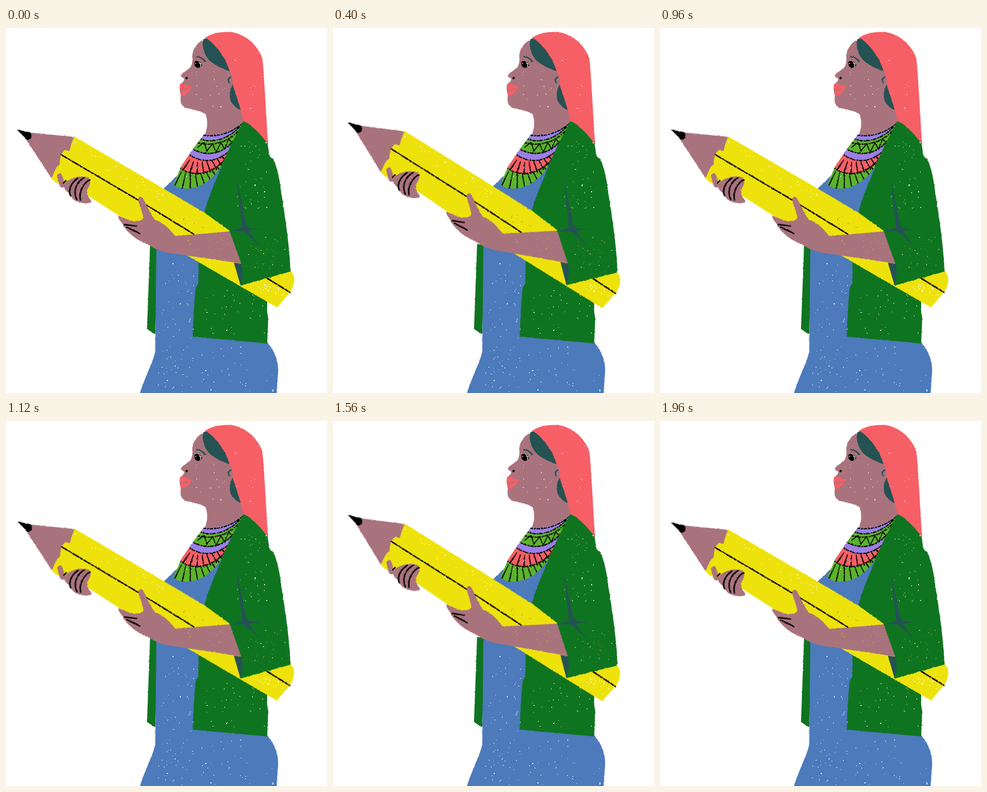
Animation of 617x700 px, one loop 2 s. Source, as an HTML page:

```html
<!DOCTYPE html>
<html lang="en">
<head>
<meta charset="utf-8">
<title>Woman with a giant pencil</title>
<style>
  html, body { margin: 0; width: 100%; height: 100%; overflow: hidden; background: #fff; }
  svg { display: block; width: 100%; height: 100%; }
  .skin { fill: #a9737d; }
  .coral { fill: #f65f66; }
  .jacket { fill: #0f7420; }
  .dress { fill: #4c7abb; }
  .teal { fill: #255253; }
  .lime { fill: #5bb32b; }
  .lilac { fill: #9b80e6; }
  .yellow { fill: #eee20d; }
  .ink { fill: none; stroke: #0b0a08; stroke-linecap: round; }
  .ticks { fill: none; stroke: #0b0a08; }
  .beads { fill: none; stroke: #0b0a08; stroke-width: 2.4; stroke-dasharray: 7 1.5 4 1; }
  #lift {
    transform-origin: 476px 420px;
    animation: lift .5s cubic-bezier(.37, 0, .63, 1) infinite alternate;
  }
  @keyframes lift {
    from { transform: rotate(0deg); }
    to { transform: rotate(1.95deg); }
  }
</style>
</head>
<body>
<svg viewBox="0 0 617 700">
  <defs>
    <filter id="rough" x="-5%" y="-5%" width="110%" height="110%" color-interpolation-filters="sRGB">
      <feTurbulence type="fractalNoise" baseFrequency=".35" numOctaves="2" seed="4"/>
      <feDisplacementMap in="SourceGraphic" scale="2.6" xChannelSelector="R" yChannelSelector="G"/>
    </filter>
    <clipPath id="collar">
      <path d="M381 204L358 234L337 265L322 299C328 309 350 311 372 303C390 294 405 280 413 266C422 246 442 208 457 179C440 197 405 209 381 204Z"/>
    </clipPath>
  </defs>

  <g filter="url(#rough)">
    <path class="jacket" d="M277 415H292L287 588L271 577Z"/>
    <path class="dress" d="M303 308L325 287L400 220L457 180L420 270L392 360L380 580L500 596L503 604C518 622 524 640 523 660L520 702H257C267 668 284 640 287 618L289 415Z"/>

    <!-- head -->
    <path class="skin" d="M381 22C366 28 358 42 358 55C359 63 358 70 354 76C346 83 337 87 336 92C337 95 341 95 343 98C342 103 336 106 334 111C333 118 335 124 336 130C334 140 337 150 345 153C358 157 376 158 384 166C388 178 388 194 381 207L425 212L458 180C460 150 450 100 432 78Z"/>
    <path class="teal" d="M379 22C376 38 382 54 393 64C406 74 419 79 430 83L420 40L388 18Z"/>
    <path class="teal" d="M436 108C430 117 428 132 433 142C439 150 445 156 451 157L452 140Z"/>
    <path class="coral" d="M383 18C400 8 425 5 443 10C470 18 488 42 493 60C497 100 500 170 504 223L456 178C451 150 440 125 435 106C437 98 434 88 430 83C422 57 405 33 383 18Z"/>
    <path d="M433 94C427 95 426 102 430 106" fill="none" stroke="#255253" stroke-width="2.6"/>
    <path d="M366 55Q377 55 383 65" fill="none" stroke="#255253" stroke-width="3.2"/>
    <path d="M363 64C368 62 374 65 377 70C374 76 369 78 365 75C361 71 361 67 363 64Z"/>
    <path d="M371 66l4 3l-2 5M364 67l1 2" fill="none" stroke="#fff" stroke-width="1.3"/>
    <ellipse cx="347" cy="96" rx="2" ry="2.5"/>
    <path class="coral" d="M335 107C340 104 345 111 358 112C354 118 347 130 338 130C334 127 336 122 335 118C333 114 334 110 335 107Z"/>
    <path d="M335 119Q344 120 350 116" fill="none" stroke="#a9737d" stroke-width="2.2"/>

    <!-- necklace -->
    <g clip-path="url(#collar)">
      <path class="lime" d="M310 170H470V320H310Z"/>
      <path class="ticks" stroke-width="38" stroke-dasharray="2.2 10.5" d="M318 284C345 308 395 298 426 258"/>
      <path class="coral" d="M332 265C350 286 395 286 424 248L470 165L350 180Z"/>
      <path class="ticks" stroke-width="24" stroke-dasharray="2.2 8.8" d="M338 254C358 278 398 274 432 235"/>
      <path class="lilac" d="M346 238C375 263 410 258 436 229L470 165L350 180Z"/>
      <path class="lime" d="M354 229C380 247 415 246 441 212L470 165L350 180Z"/>
      <path class="ink" stroke-width="1.8" d="M368 229L381 219L386 236L397 222L404 238L413 220L420 232L428 213L434 219"/>
      <path class="lilac" d="M370 211C395 224 430 212 450 188L470 160L350 180Z"/>
      <path class="beads" d="M332 265C350 286 395 286 424 248M346 238C375 263 410 258 436 229M354 229C380 247 415 246 441 212M370 211C395 224 430 212 450 188M366 219C393 229 428 219 448 196M378 205C405 211 440 200 457 179"/>
    </g>

    <path class="jacket" d="M456 179C470 181 495 211 503 222L506 245L514 252C522 270 526 290 529 315C537 365 545 420 547 466L502 484V545L504 557L502 605L359 592C360 560 362 520 365 497L370 490V440L381 355C388 325 404 292 414 266C424 238 442 206 456 179Z"/>
  </g>
  <g id="flecks"></g>

  <g id="lift">
    <g filter="url(#rough)">
      <path class="skin" d="M40 200L133 209L110 292L88 289L38 213Z"/>
      <path d="M21 195L46 200C51 206 49 214 41 215Z"/>
      <path class="yellow" d="M131 208L303 308L381 354L430 389L547 465L553 474C556 486 552 499 545 508L521 536L346 435L216 359L158 322L95 296L87 288L98 266L103 262L105 243L113 234L122 236L125 224Z"/>
      <path class="ink" stroke-width="2.7" stroke-dasharray="13 2.8 6 3.2" d="M106 243L256 331L362 396M502 480L546 507"/>

      <path d="M103 284L108 301" fill="none" stroke="#a9737d" stroke-width="10" stroke-linecap="round"/>
      <path class="skin" d="M110 303C116 290 140 280 159 287C164 294 162 300 158 306C154 314 156 322 163 330L164 334C155 338 145 336 139 334C131 331 125 326 123 318C117 315 112 309 110 303Z"/>
      <path class="ink" stroke-width="3" d="M138 288C125 297 119 310 124 322M150 287C133 297 129 315 136 329M161 291C147 299 140 315 143 330M111 297L115 293"/>

      <path class="skin" d="M254 329C255 321 263 323 265 330C272 345 280 358 286 368C300 371 315 385 325 399L432 390L455 452L325 433C305 432 290 425 272 415C250 406 232 393 222 373C218 369 215 363 216 360C225 364 240 370 248 371C255 370 262 369 264 364C262 350 255 338 254 329Z"/>
      <path class="ink" stroke-width="2.8" d="M228 377L251 380M232 382L257 394"/>

      <path class="jacket" d="M430 390L441 374L500 368L537 400L547 467L451 494L452 451Z"/>
      <path class="teal" d="M438 450L453 452L455 470L451 494Z"/>
    </g>
    <g id="liftFlecks"></g>
  </g>

  <path class="teal" filter="url(#rough)" d="M442 282L451 325L461 376L466 383L491 387L467 388L474 400L488 417L457 390L430 390L454 383L448 330Z"/>
</svg>
<script>
  let seed = 17;
  const rnd = () => (seed = (seed * 16807) % 2147483647) / 2147483647;

  // Scatter tiny paint gaps over a parallelogram; slant shifts y per unit of x.
  function scatter(parent, color, count, x, y, w, h, slant = 0) {
    let d = '';
    for (let i = 0; i < count; i++) {
      const dx = rnd() * w, size = rnd() < .25 ? 2 : 1;
      const px = Math.round(x + dx), py = Math.round(y + rnd() * h + dx * slant);
      d += `M${px} ${py}h${size}v${rnd() < .3 ? 2 : 1}h${-size}z`;
    }
    const path = document.createElementNS('http://www.w3.org/2000/svg', 'path');
    path.setAttribute('d', d);
    path.setAttribute('fill', color);
    document.getElementById(parent).append(path);
  }

  scatter('flecks', '#fff', 75, 292, 610, 222, 88);
  scatter('flecks', '#fff', 40, 292, 440, 70, 160);
  scatter('flecks', '#fff', 36, 372, 500, 126, 90);
  scatter('flecks', '#fff', 44, 442, 215, 60, 135);
  scatter('flecks', '#fff', 10, 440, 30, 46, 130);
  scatter('flecks', '#fff', 14, 362, 75, 62, 80);
  scatter('flecks', '#fff', 8, 335, 270, 65, 20, -.3);

  scatter('liftFlecks', '#fff', 24, 130, 215, 180, 20, .59);
  scatter('liftFlecks', '#fff', 30, 485, 487, 58, 14, .25);
  scatter('liftFlecks', '#8a8a20', 18, 300, 322, 115, 45, .6);
  scatter('liftFlecks', '#c9a23a', 26, 330, 402, 105, 28);
  scatter('liftFlecks', '#8f9a18', 28, 455, 400, 70, 65);
  scatter('liftFlecks', '#fff', 12, 460, 400, 75, 65);
</script>
</body>
</html>
```
